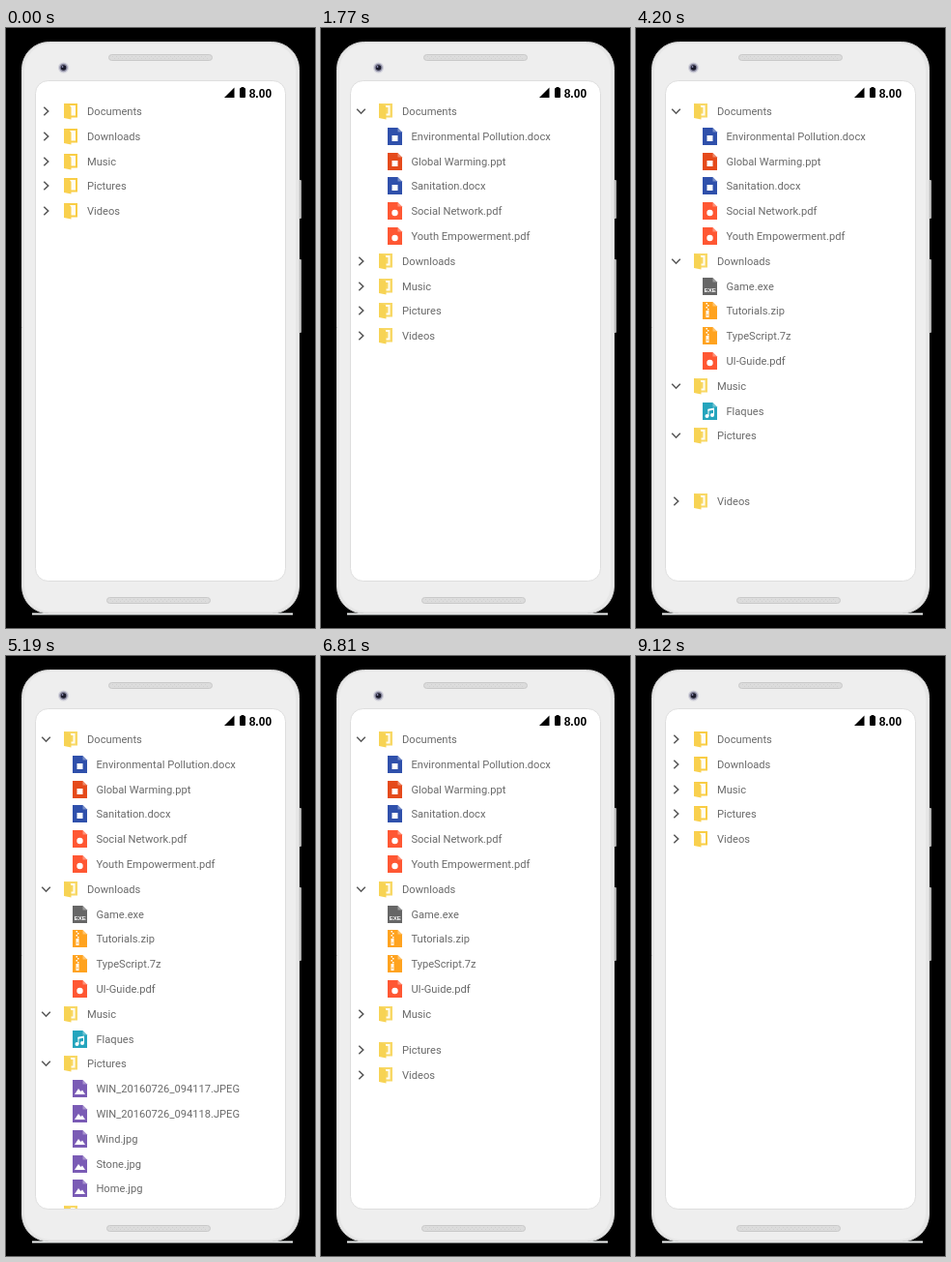
An HTML page with a canvas that plays this animation: 320 by 620 pixels, repeating every 9540 ms.

```html
<!DOCTYPE html>
<html lang="en">
<head>
<meta charset="utf-8">
<title>File tree on a phone</title>
<style>
  html, body { margin: 0; width: 100%; height: 100%; overflow: hidden; background: #000; }
  canvas { display: block; width: 320px; height: 620px; }
</style>
</head>
<body>
<canvas id="stage" width="320" height="620"></canvas>
<script>
const ctx = document.getElementById('stage').getContext('2d');
const LOOP = 9540, STEP = 30;
const FIRST_ROW = 86, ROW = 25.8;
const LABEL_FONT = '11.15px Roboto, "Noto Sans", sans-serif';
const BOLD = 'Liberation Sans, Arial, sans-serif';

const COLORS = {
  docx: '#2f50ab', ppt: '#e54a1b', pdf: '#ff5733', exe: '#666',
  zip: '#ffa31f', '7z': '#ffa31f', mp3: '#25a5bd', jpeg: '#7a5bb5', jpg: '#7a5bb5'
};

// open and close hold [start, duration] in ms
const folders = [
  { name: 'Documents', open: [720, 690], close: [8190, 390],
    files: ['Environmental Pollution.docx', 'Global Warming.ppt', 'Sanitation.docx',
            'Social Network.pdf', 'Youth Empowerment.pdf'] },
  { name: 'Downloads', open: [1830, 690], close: [7244, 390],
    files: ['Game.exe', 'Tutorials.zip', 'TypeScript.7z', 'UI-Guide.pdf'] },
  { name: 'Music', open: [2850, 600], close: [6600, 390], files: ['Flaques'] },
  { name: 'Pictures', open: [3895, 950], close: [5850, 390],
    files: ['WIN_20160726_094117.JPEG', 'WIN_20160726_094118.JPEG',
            'Wind.jpg', 'Stone.jpg', 'Home.jpg'] },
  { name: 'Videos', files: [] }
];

const clamp = v => Math.max(0, Math.min(1, v));
const progress = (t, [start, length]) => clamp((t - start) / length);
const easeInOut = p => (1 - Math.cos(Math.PI * p)) / 2;

function fillRound(x, y, w, h, r, fill, stroke) {
  ctx.beginPath();
  ctx.roundRect(x, y, w, h, r);
  if (fill) { ctx.fillStyle = fill; ctx.fill(); }
  if (stroke) { ctx.strokeStyle = stroke; ctx.lineWidth = 1; ctx.stroke(); }
}

function rect(x, y, w, h, color) {
  ctx.fillStyle = color;
  ctx.fillRect(x, y, w, h);
}

function shape(points, color) {
  ctx.beginPath();
  points.forEach(([x, y]) => ctx.lineTo(x, y));
  ctx.closePath();
  ctx.fillStyle = color;
  ctx.fill();
}

function disc(x, y, r, color) {
  ctx.beginPath();
  ctx.arc(x, y, r, 0, Math.PI * 2);
  ctx.fillStyle = color;
  ctx.fill();
}

function label(text, x, y, color, font) {
  ctx.font = font;
  ctx.fillStyle = color;
  ctx.fillText(text, x, y);
}

function drawSpeaker(x, y) {
  fillRound(x + .5, y + .5, 107, 6, 3, '#dcdcdc', '#c9c9c9');
  for (let i = 0; i < 50; i++) {
    rect(x + 4 + i * 2, y + 2 + i % 2 * 2, 1, 1, '#d0d0d0');
  }
}

function drawPhone() {
  rect(0, 0, 320, 620, '#000');
  const side = ctx.createLinearGradient(302, 0, 306, 0);
  side.addColorStop(0, '#dedede');
  side.addColorStop(1, '#a4a4a4');
  fillRound(301, 157, 5, 40, 1, side);
  fillRound(301, 239, 5, 76, 1, side);
  rect(27, 604.5, 270, 2, '#eef1f1');
  fillRound(16.5, 14.5, 287, 590.5, 28, '#e6e6e6', '#dadada');
  fillRound(19, 16, 281, 587, 27, '#eeeeee');
  drawSpeaker(106, 27);
  drawSpeaker(104, 588);
  disc(59.5, 41, 5.5, '#d0d0da');
  disc(59.5, 41, 4.2, '#8e8ea4');
  disc(59.5, 41, 2.8, '#1c1c2c');
  disc(58.5, 40, .9, '#8d8db5');
  fillRound(30.5, 54.5, 259, 517, 13, '#fff', '#dedede');
}

function drawStatus() {
  shape([[226, 72], [236.5, 61.5], [236.5, 72]], '#000');
  rect(243.5, 61, 3, 2, '#000');
  fillRound(242, 62, 6, 10, 1, '#000');
  label('8.00', 251.7, 72, '#000', `bold 12px ${BOLD}`);
}

function drawChevron(y, turn) {
  ctx.save();
  ctx.translate(41.5, y);
  ctx.rotate(turn * Math.PI / 2);
  ctx.beginPath();
  ctx.moveTo(-2.2, -4.3);
  ctx.lineTo(2.2, 0);
  ctx.lineTo(-2.2, 4.3);
  ctx.strokeStyle = '#5a5a5a';
  ctx.lineWidth = 1.6;
  ctx.stroke();
  ctx.restore();
}

function drawFolder(y, bright) {
  ctx.save();
  ctx.translate(59, y - 8);
  const back = bright ? '#f9cd45' : '#f8d866';
  rect(1, 0, 14, 14.5, back);
  rect(bright ? 7 : 8, 2, bright ? 6 : 4.5, 10.5, '#fffdf2');
  if (!bright) rect(8, 4, 2.5, 6.5, back);
  shape([[1, 0], [7, 2], [8.5, 4], [8.5, 16.5], [1, 15]], bright ? '#f9d04e' : '#f7d354');
  ctx.restore();
}

function drawZipper() {
  for (let i = 0; i < 4; i++) rect(3.5 + i % 2 * 1.5, 1 + i * 2, 1.5, 1.5, '#fff');
  rect(3.5, 9, 3, 7, '#fff');
  rect(4.5, 12.5, 1, 2, COLORS.zip);
}

function drawNote() {
  disc(4.5, 14, 2, '#fff');
  disc(10, 13, 2, '#fff');
  rect(5.5, 7, 1, 7, '#fff');
  rect(11, 6, 1, 7, '#fff');
  shape([[5.5, 6.8], [12, 5.5], [12, 7.5], [5.5, 8.8]], '#fff');
}

function drawFileIcon(y, type) {
  ctx.save();
  ctx.translate(69, y - 9);
  shape([[0, 0], [10.5, 0], [15, 4.5], [15, 18], [0, 18]], COLORS[type]);
  shape([[10.5, 0], [10.5, 4.5], [15, 4.5]], 'rgba(255,255,255,.35)');
  if (type === 'exe') label('EXE', 1.8, 15.3, '#fff', `bold 6px ${BOLD}`);
  else if (type === 'zip' || type === '7z') drawZipper();
  else if (type === 'mp3') drawNote();
  else if (type.startsWith('jp')) shape([[2, 15], [6, 9], [8.5, 12], [10, 10.5], [13, 15]], '#fff');
  else if (type === 'pdf') disc(7.5, 11, 3.2, '#fff');
  else rect(4.5, 8, 6, 6, '#fff');
  ctx.restore();
}

function drawFile(name, y) {
  const type = name.includes('.') ? name.split('.').pop().toLowerCase() : 'mp3';
  drawFileIcon(y, type);
  label(name, 93.4, y + 4, '#6a6a6a', LABEL_FONT);
}

function folderState(folder, t) {
  if (!folder.open) return { spread: 0, turn: 0, alpha: 0 };
  const { open, close } = folder;
  const opening = progress(t, open);
  return {
    spread: opening - easeInOut(progress(t, close)),
    turn: progress(t, [open[0], 200]) - progress(t, [close[0], 140]),
    alpha: t < close[0] ? clamp((opening - .65) / .35) : 0
  };
}

function drawTree(t) {
  const bright = t < 75 || t >= 9060;
  let y = FIRST_ROW;
  for (const folder of folders) {
    const { spread, turn, alpha } = folderState(folder, t);
    const rowY = Math.round(y);
    drawChevron(rowY, turn);
    drawFolder(rowY, bright);
    label(folder.name, 84, rowY + 4, '#6a6a6a', LABEL_FONT);
    if (alpha > 0) {
      ctx.globalAlpha = alpha;
      folder.files.forEach((name, i) => drawFile(name, Math.round(y + ROW * (i + 1))));
      ctx.globalAlpha = 1;
    }
    y += ROW * (1 + folder.files.length * spread);
  }
}

function frame() {
  const t = Math.floor(performance.now() % LOOP / STEP) * STEP;
  drawPhone();
  drawStatus();
  ctx.save();
  ctx.beginPath();
  ctx.roundRect(31, 55, 258, 516, 12);
  ctx.clip();
  drawTree(t);
  ctx.restore();
  requestAnimationFrame(frame);
}
frame();
</script>
</body>
</html>
```
